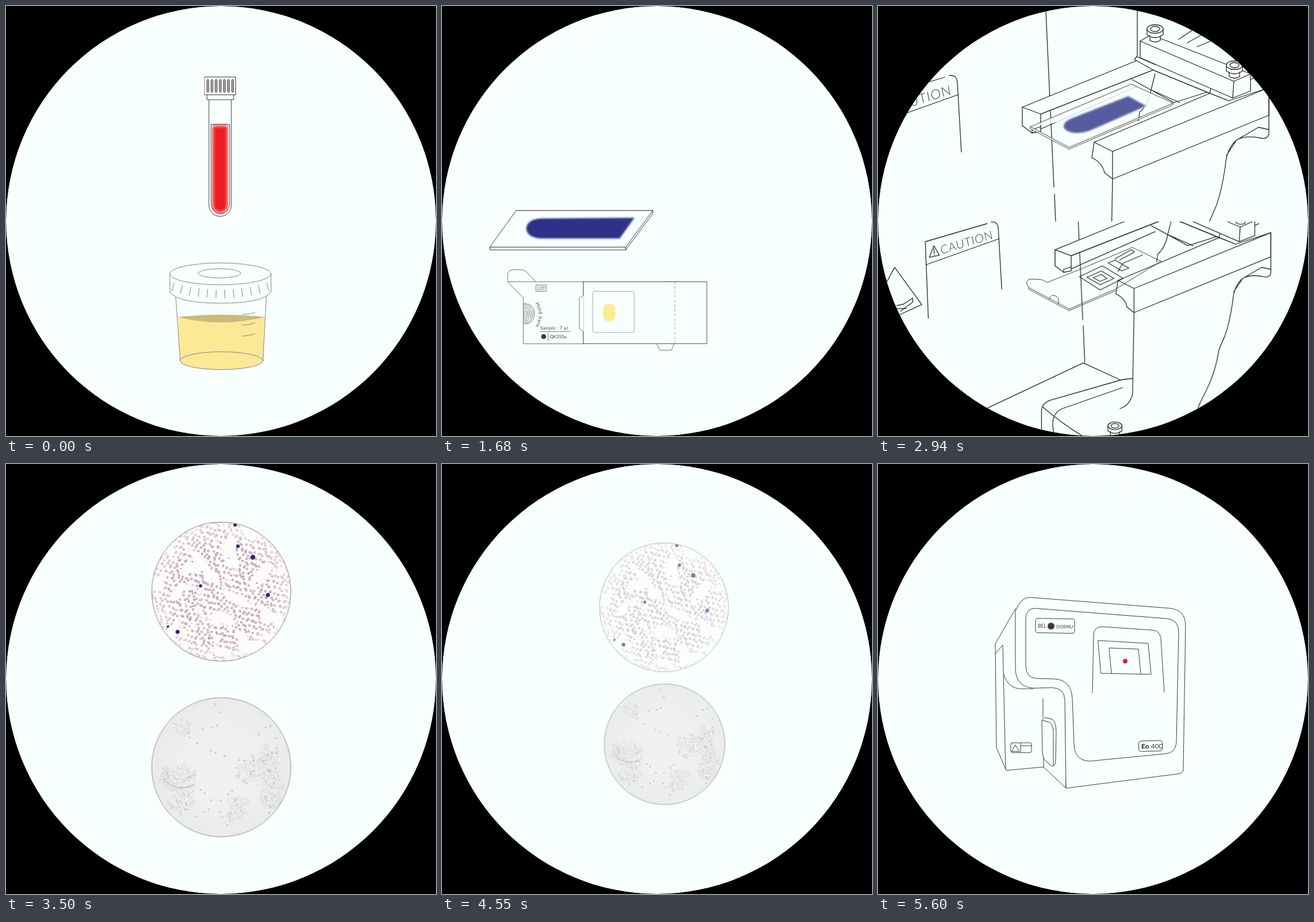
Write an HTML page without scripts that moves like this. It is 748 by 748 pixels and loops after 5.67 s.

```html
<!DOCTYPE html>
<html lang="en">
<head>
<meta charset="utf-8">
<title>Sample to result</title>
<style>
  html, body { margin: 0; height: 100%; overflow: hidden; background: #000; }
  svg { display: block; width: 100vw; height: 100vh; }
  text { font-family: Lato, "Open Sans", sans-serif; fill: #443c42; stroke: none; }
  .line { fill: none; stroke: #41383c; stroke-width: 1; stroke-linejoin: round; stroke-linecap: round; }
  .paper { fill: #f8ffff; }
  .soft { stroke: #877f82; }
  .bold { stroke: #2b2527; stroke-width: 1.3; }
  .anim { animation: 5670ms linear infinite; }
  .navy { fill: #2e3087; }

  /* blood tube and urine cup */
  .samples { animation-name: samples; }
  @keyframes samples { 0%, 3.7% { opacity: 1 } 6.17%, 100% { opacity: 0 } }

  /* smear and card preparation */
  .prep { animation-name: prep; }
  @keyframes prep { 0%, 3.7% { opacity: 0 } 7.41%, 39% { opacity: 1 } 40.7%, 100% { opacity: 0 } }
  .slide { animation-name: slide; }
  @keyframes slide {
    0%, 23.46% { transform: translate(0, 0) scale(1) }
    29.63%, 34.57% { transform: translate(2px, 261px) scale(.607) }
    40.7%, 100% { transform: translate(532px, 443px) scale(.1) }
  }
  .card { animation-name: card; }
  @keyframes card {
    0%, 23.46% { transform: translate(0, 0) scale(1) }
    29.63%, 34.57% { transform: translate(31px, 175.7px) scale(.722) }
    40.7%, 100% { transform: translate(532px, 417px) scale(.1) }
  }
  .stain { animation-name: stain; }
  @keyframes stain { 0%, 17.28% { fill: #ec1c24 } 22.22%, 100% { fill: #2e3087 } }
  .cover { transform-origin: 298px 421px; animation-name: cover; }
  @keyframes cover {
    0%, 8.64% { transform: matrix(1, 0, 0, 1, 0, 0) }
    14.81% { transform: matrix(.11, -.044, 0, 1, 0, 0) }
    17.28%, 18.5% { transform: matrix(-.35, -.04, 0, 1, 0, 0) }
    22.22%, 100% { transform: matrix(1, 0, 0, 1, 0, 0) }
  }
  .drop { animation-name: drop; }
  @keyframes drop {
    0%, 9.88% { transform: translateY(-14px); opacity: 0 }
    11.11% { transform: translateY(-8px); opacity: 1 }
    14.81% { transform: none; opacity: 1 }
    20% { transform: translateY(80px); opacity: 1 }
    21%, 100% { transform: translateY(90px); opacity: 0 }
  }
  .bead { animation-name: bead; }
  @keyframes bead {
    0%, 13.57% { transform: translateY(-8px); opacity: 0 }
    14.81% { transform: none; opacity: 1 }
    18.5% { transform: translateY(134px); opacity: 1 }
    18.6%, 100% { transform: translateY(134px); opacity: 0 }
  }
  .spot { transform-origin: 360px 496px; animation-name: spot; }
  @keyframes spot { 0%, 18.4% { transform: scale(0) } 20.5%, 100% { transform: scale(1) } }

  /* analyser: arrival, then a push in to the slot */
  .arrive { animation-name: arrive; }
  @keyframes arrive {
    0%, 30.86% { transform: translate(390px, 100px) scale(.75); opacity: 0 }
    33.33%, 40.7% { transform: translate(345px, 100px) scale(.75); opacity: 1 }
    44.44% { transform: translate(-295px, -864px) scale(2.4); opacity: 1 }
    45.68%, 100% { transform: translate(-295px, -864px) scale(2.4); opacity: 0 }
  }
  .bay { animation-name: bay; }
  @keyframes bay { 0%, 44.44% { opacity: 0 } 45.68%, 54.32% { opacity: 1 } 55.56%, 100% { opacity: 0 } }
  .insert { animation-name: insert; }
  @keyframes insert {
    0%, 45.68% { transform: translate(-104px, 45px) }
    51.85% { transform: none }
    54.32%, 100% { transform: translate(42px, -18px) }
  }

  /* microscope fields */
  .blood { animation-name: blood; }
  @keyframes blood {
    0%, 55.56% { transform: translate(374px, 222px) scale(.6); opacity: 0 }
    60.49%, 79.01% { transform: translate(374.5px, 222px) scale(1); opacity: 1 }
    80.25% { transform: translate(386px, 249px) scale(.93); opacity: .6 }
    84.66%, 100% { transform: translate(430px, 343px) scale(.03); opacity: 0 }
  }
  .urine { animation-name: urine; }
  @keyframes urine {
    0%, 55.56% { transform: translate(374px, 527px) scale(.6); opacity: 0 }
    60.49%, 79.01% { transform: translate(374.5px, 527.5px) scale(1); opacity: 1 }
    80.25% { transform: translate(387px, 488px) scale(.87); opacity: .95 }
    84.66%, 100% { transform: translate(430px, 343px) scale(.03); opacity: 0 }
  }

  /* analyser: pull back around the result dot */
  .result { transform-origin: 430px 343px; animation-name: result; }
  @keyframes result {
    0%, 80.5% { transform: scale(1.75); opacity: 0 }
    82.72% { transform: scale(1.58); opacity: 1 }
    90.74%, 100% { transform: scale(1); opacity: 1 }
  }
</style>
</head>
<body>
<svg viewBox="0 0 748 748">
  <defs>
    <clipPath id="stage"><circle cx="374" cy="374" r="374"/></clipPath>
    <clipPath id="upper"><path d="M0 0H748V375H0z"/></clipPath>
    <clipPath id="lower"><path d="M0 375H748V748H0z"/></clipPath>
    <clipPath id="field"><circle r="121"/></clipPath>
    <clipPath id="cardEdge"><path d="M153 460H200V540H153z"/></clipPath>
    <filter id="feather" x="-10%" y="-20%" width="120%" height="140%"><feGaussianBlur stdDeviation="3"/></filter>
    <filter id="edge" x="-10%" y="-20%" width="120%" height="140%"><feGaussianBlur stdDeviation="1.8"/></filter>

    <filter id="clump" x="0" y="0" width="1" height="1" color-interpolation-filters="sRGB">
      <feTurbulence type="fractalNoise" baseFrequency=".035" numOctaves="2" seed="11"/>
      <feColorMatrix values="0 0 0 0 0  0 0 0 0 0  0 0 0 0 0  0 0 14 0 -5.6" result="clumps"/>
      <feComposite in="SourceGraphic" in2="clumps" operator="in"/>
    </filter>
    <filter id="scatter" x="0" y="0" width="1" height="1" color-interpolation-filters="sRGB">
      <feTurbulence type="fractalNoise" baseFrequency=".06" numOctaves="2" seed="4" result="push"/>
      <feDisplacementMap in="SourceGraphic" in2="push" scale="24" xChannelSelector="R" yChannelSelector="G"/>
    </filter>
    <circle id="cell" r="1.700" fill="#e0c6d3" stroke="#b085a0" stroke-width=".9"/>
    <pattern id="cellsA" width="23" height="19" patternUnits="userSpaceOnUse" patternTransform="rotate(17)">
      <use href="#cell" x="3" y="3"/><use href="#cell" x="8" y="6"/><use href="#cell" x="18" y="4"/><use href="#cell" x="13" y="13"/><use href="#cell" x="4" y="15"/><use href="#cell" x="20" y="14"/>
    </pattern>
    <pattern id="cellsB" width="29" height="31" patternUnits="userSpaceOnUse" patternTransform="rotate(-38)">
      <use href="#cell" x="4" y="5"/><use href="#cell" x="17" y="3"/><use href="#cell" x="12" y="13"/><use href="#cell" x="25" y="11"/><use href="#cell" x="7" y="22"/><use href="#cell" x="20" y="20"/><use href="#cell" x="15" y="28"/>
    </pattern>
    <pattern id="debris" width="13" height="11" patternUnits="userSpaceOnUse" patternTransform="rotate(24)">
      <path d="M1 8Q4 0 9 3T12 9M3 10L8 6" fill="none" stroke="#b2b2ae" stroke-width=".8"/>
    </pattern>
    <radialGradient id="lamp"><stop offset=".5" stop-color="#f0f0f0"/><stop offset="1" stop-color="#eaebeb"/></radialGradient>
    <radialGradient id="haze"><stop offset=".7" stop-color="#fcfdfa" stop-opacity="0"/><stop offset="1" stop-color="#fcfdfa" stop-opacity=".5"/></radialGradient>

    <path id="blueDrop" d="M0 0L10 28Q0 38-10 28z"/>
    <rect id="rib" x="349.500" y="128" width="3.200" height="22" rx="1.600" fill="#b5aeb0"/>
    <g id="screw">
      <path class="paper" d="M-9 12V20Q0 25 9 20V12M-14 0V10Q0 20 14 10V0"/>
      <ellipse class="paper" rx="14" ry="7.500"/><ellipse rx="8" ry="4.500"/>
    </g>

    <g id="device" class="line">
      <path class="paper" d="M239 252L204 313L206 493L223 533L288 527L326 563L340 400z"/>
      <path d="M204 330L217 315L222 531M219 366Q226 392 252 391H270M287 408V440M288 527V510"/>
      <path class="paper" d="M239 256Q248 232 264 232L508 251Q535 254 535 282L531 531Q531 538 522 539L327 564L325 410Q324 390 303 389L270 390Q239 387 239 355z"/>
      <path d="M257 268Q258 252 272 251L503 269Q523 271 523 292L519 485Q517 503 500 504L367 517Q342 515 341 488L338 408Q336 376 308 374L275 373Q257 372 257 350z"/>
      <path class="paper" d="M285 450Q285 441 291 441L303 444Q309 447 310 465L309 515Q309 527 302 525L292 517Q287 514 286 500z"/>
      <path d="M286 446L298 449Q304 451 305 465V524"/>
      <rect x="231" y="485" width="36" height="17" rx="3"/><path d="M239 489L246 500H233zM248 485V502M248 490H267"/>
      <path d="M373 398L375 297Q376 283 390 283L478 289Q490 290 492 303L498 397M383 307L470 312L475 366L388 364zM406 364L402 320L453 322L457 364"/>
      <rect x="274" y="269" width="68" height="25" rx="4" transform="rotate(1 308 281)"/>
      <circle cx="301" cy="282" r="6" fill="#41383c" stroke="none"/>
      <text x="278" y="285" font-size="8.500">BEL</text><text x="310" y="286" font-size="8">DORNU</text>
      <rect x="453.500" y="481.500" width="41" height="18" rx="4" transform="rotate(-2 474 490)"/>
      <text x="458" y="495" font-size="12"><tspan font-weight="900">Eo</tspan> 400</text>
    </g>

    <g id="dock">
      <path d="M292 9L306 315M307 327L310 400M451 8V88"/>
      <path d="M523 58L556 36M538 64L585 38M555 71L600 52"/>
      <path class="paper" d="M251 176L450 95L482 110L283 188V218L268 221L251 208z"/>
      <path d="M251 176L283 188M268 221V215L283 210M283 188L482 110M283 214L450 140M442 128L515 168L572 150M482 118L475 146L525 168M453 200L455 185Q470 172 475 146"/>
      <path class="paper" d="M446 93L450 88L482 102V94Q486 89 492 92L570 128Q582 135 577 152L480 112z"/>
      <path class="paper" d="M456 61L475 50L648 118V148L617 160L456 90z"/>
      <path d="M456 61L619 131L648 118M619 131L617 160M480 112L578 152L610 165M648 128L656 124"/>
      <path class="paper" d="M376 237L577 152L610 165L680 142V190L408 301L394 290Q390 272 372 264z"/>
      <path d="M376 237L408 253L680 142M408 253V301L405 463"/>
      <path d="M680 142V222Q678 232 667 230Q640 224 624 233Q606 248 604 280Q598 320 589 346L577 374Q570 420 551 457T536 491M606 260L624 233L662 211L680 215"/>
      <use href="#screw" x="482" y="40"/><use href="#screw" x="620" y="103"/>
      <path d="M-1 312L-7 160L116 124M124 121Q136 119 138 132L145 254M-6 206L140 154M-68 211L-14 285L-60 306L-100 270zM-64 287L-50 284L-32 272V280L-56 298M-64 293H-45"/>
      <path d="M10 168L21 187L1 191zM10 174L11 183M11 186V187"/>
      <text transform="translate(25 185) rotate(-17) skewX(-5)" font-size="23" font-weight="300" letter-spacing="1">CAUTION</text>
      <path d="M116 491L307 401L379 434M224 546V497Q224 481 242 475L385 434L405 432M405 463Q400 485 380 492M250 546Q238 503 265 492L385 450M226 488Q262 520 305 546"/>
      <use href="#screw" x="370" y="526"/>
    </g>
  </defs>

  <g clip-path="url(#stage)">
    <circle class="paper" cx="374" cy="374" r="374"/>

    <g class="anim samples">
      <g class="line">
        <path d="M353 163V346a19.500 20 0 0 0 39 0V163"/>
        <path d="M361 210H384V346a11.500 12 0 0 1-23 0z" fill="#ec1c24" stroke="#ec1c24" stroke-width="4" filter="url(#feather)"/>
        <path d="M357 206H389V344a16 17 0 0 1-32 0z"/>
        <path class="paper" d="M345.500 123.500H399.500V154.500H345.500zM350 154.500H396V163H350z"/>
        <use href="#rib"/><use href="#rib" x="7.200"/><use href="#rib" x="14.400"/><use href="#rib" x="21.600"/><use href="#rib" x="28.800"/><use href="#rib" x="36"/><use href="#rib" x="43.200"/>
      </g>
      <g class="line soft">
        <path d="M299 541H450L447 617A72 15.500 0 0 1 303 617z" fill="#fbe996" stroke="none"/>
        <path d="M299 541Q375 533 450 541Q375 560 299 541" fill="#cdb97a" stroke="none"/>
        <path d="M295 503L303 617M453 503L447 617M411 536Q423 537 433 533M411 555Q423 555 433 551M411 574Q423 574 433 570"/>
        <ellipse cx="375" cy="617" rx="72" ry="15.500"/>
        <path class="paper" d="M285 466V498Q300 517 373 517T461 498V466z"/>
        <path d="M290 489Q373 513 456 489" stroke-width="15" stroke-dasharray="1 14.200" stroke-linecap="butt"/>
        <ellipse class="paper" cx="373" cy="466" rx="88" ry="19"/><ellipse cx="371.500" cy="465" rx="37" ry="8"/>
      </g>
    </g>

    <g class="anim arrive"><use href="#device"/></g>

    <g class="anim prep">
      <g class="anim slide">
        <g class="line bold" style="stroke-width:1.6">
          <path class="paper" d="M210 156H601V165L523 269H134V261z"/><path d="M134 261H523L601 156M523 261V269"/>
        </g>
        <path class="anim stain" filter="url(#feather)" d="M278 179L548 177L506 236H278C225 234 225 182 278 179"/>
        <g class="navy">
          <g class="anim drop"><use href="#blueDrop" transform="translate(370.500 110)"/></g>
          <g class="anim drop"><use href="#blueDrop" transform="translate(488 80) scale(.83)"/></g>
          <g class="anim drop"><use href="#blueDrop" transform="translate(296 73) scale(.32)"/></g>
        </g>
      </g>
      <g class="anim card line">
        <path class="paper" d="M153 570V460L115 421V407Q115 392 130 392H147Q155 392 160 397L183 421H298V570z"/>
        <path d="M115 421H183M474 570L482 586H510L516 570"/>
        <path d="M298 421H595V570H298z" fill="#eee"/>
        <rect class="paper" x="312" y="433" width="122" height="125" rx="6"/>
        <path class="paper" d="M493 421H535V570H493z"/>
        <g clip-path="url(#cardEdge)" stroke-dasharray="13 2 22 3">
          <ellipse cx="157" cy="498" rx="3" ry="6"/><ellipse cx="157" cy="498" rx="7" ry="10"/><ellipse cx="157" cy="498" rx="11" ry="14"/><ellipse cx="157" cy="498" rx="15" ry="18"/><ellipse cx="157" cy="498" rx="19" ry="22"/><ellipse cx="157" cy="498" rx="23" ry="25"/>
        </g>
        <path id="bow" d="M182 473Q198 498 182 530" stroke="none"/>
        <text font-size="12" letter-spacing=".8"><textPath href="#bow">Hold here</textPath></text>
        <rect x="184" y="429" width="24" height="15"/><text x="187" y="440.500" font-size="10">LOT</text>
        <text x="194" y="537" font-size="10.500" letter-spacing=".6">Sample : 7 µl</text>
        <path d="M194 541H266M213 545V563"/><circle cx="202" cy="553" r="6" fill="#41383c" stroke="none"/>
        <text x="217" y="557" font-size="10.500">QK350µ</text>
        <g class="anim cover">
          <path class="paper" d="M298 421H595V570H298z"/>
          <rect x="320" y="444" width="100" height="99" rx="5" stroke="#877f82"/>
          <path d="M518 421V570" stroke="#877f82" stroke-dasharray="6 5"/>
        </g>
        <path class="paper" d="M298 453L288 461V534L298 541"/>
        <rect class="anim spot" x="345" y="474" width="30" height="43" rx="14" fill="#fdea94" stroke="none"/>
        <path class="anim bead" d="M357 357L360 363Q357 367 354 363z" fill="#fbe06a" stroke="none"/>
      </g>
    </g>

    <g class="anim bay">
      <g clip-path="url(#upper)">
        <use href="#dock" class="line bold"/>
        <g class="anim insert">
          <path class="line" d="M265 210L440 136L513 169V172L332 249L265 214zM265 210L332 246L513 169" style="fill:#f8ffffd0"/>
          <path class="navy" d="M435 157L466 174L368 217C330 230 305 208 338 195z" filter="url(#edge)" opacity=".8"/>
        </g>
      </g>
      <g clip-path="url(#lower)">
        <use href="#dock" class="line bold" transform="translate(88.400 270) scale(.875)" style="stroke-width:1.5"/>
        <g class="anim insert line">
          <path d="M332 527L262 490Q252 477 266 475L284 476L294 481L354 457L442 420L492 444L414 492zM332 530L414 495M262 490V493L332 530M298 510Q300 500 310 505Q316 510 313 518"/>
          <path class="bold" d="M350 471L390 452L426 474L386 494zM363 472L388 461L410 474L386 485zM374 473L388 467L398 474L386 479zM400 447L412 442L436 456L424 461zM412 440L440 424L446 428L420 442M417 462L425 448L460 433"/>
        </g>
      </g>
    </g>

    <g class="anim blood">
      <g clip-path="url(#field)">
        <circle r="121" fill="#fcfdfa"/>
        <g filter="url(#clump)">
          <rect x="-125" y="-125" width="250" height="250" fill="url(#cellsA)"/>
          <rect x="-125" y="-125" width="250" height="250" fill="url(#cellsB)"/>
        </g>
        <circle r="121" fill="url(#haze)"/>
        <path d="M-70-40Q0-90 50-30T70 30T-20 80T-40-10" fill="none" stroke="#6a50a5" stroke-width="2.200" stroke-linecap="round" stroke-dasharray="0 23 0 31 0 12"/>
        <g fill="#2b2173">
          <circle cx="24" cy="-116" r="3"/><circle cx="29" cy="-79" r="3"/><circle cx="55" cy="-60" r="4"/><circle cx="-36" cy="-10" r="2.800"/><circle cx="81" cy="6" r="3.500"/><circle cx="-93" cy="61" r="2"/><circle cx="-76" cy="70" r="3.500"/>
        </g>
      </g>
      <circle class="line soft" r="121"/>
    </g>

    <g class="anim urine">
      <g clip-path="url(#field)">
        <circle r="121" fill="url(#lamp)"/>
        <g fill="url(#debris)" filter="url(#scatter)">
          <ellipse cx="-74" cy="20" rx="36" ry="26"/><ellipse cx="-68" cy="62" rx="24" ry="18"/><ellipse cx="-69" cy="-71" rx="15" ry="16"/><ellipse cx="54" cy="4" rx="30" ry="22"/><ellipse cx="88" cy="38" rx="22" ry="34"/><ellipse cx="28" cy="74" rx="22" ry="24"/><ellipse cx="84" cy="-18" rx="18" ry="18"/>
        </g>
        <path d="M-100 20Q-80 45-46 30M-104 0Q-90 8-92 20M37 24L47 29M-62 20L-45 12" fill="none" stroke="#a9aaa4"/>
        <path d="M-10-110Q20-70-34-66T-20-30T80-20T20 40T-60 60T10 100T90 40T60-50" fill="none" stroke="#b9b9b6" stroke-width="3" stroke-linecap="round" stroke-dasharray="0 17 0 26 0 9"/>
      </g>
      <circle class="line" r="121" style="stroke:#958a84"/>
    </g>

    <g class="anim result">
      <use href="#device"/>
      <circle cx="430" cy="343" r="4" fill="#ec1c24"/>
    </g>
  </g>
</svg>
</body>
</html>
```
